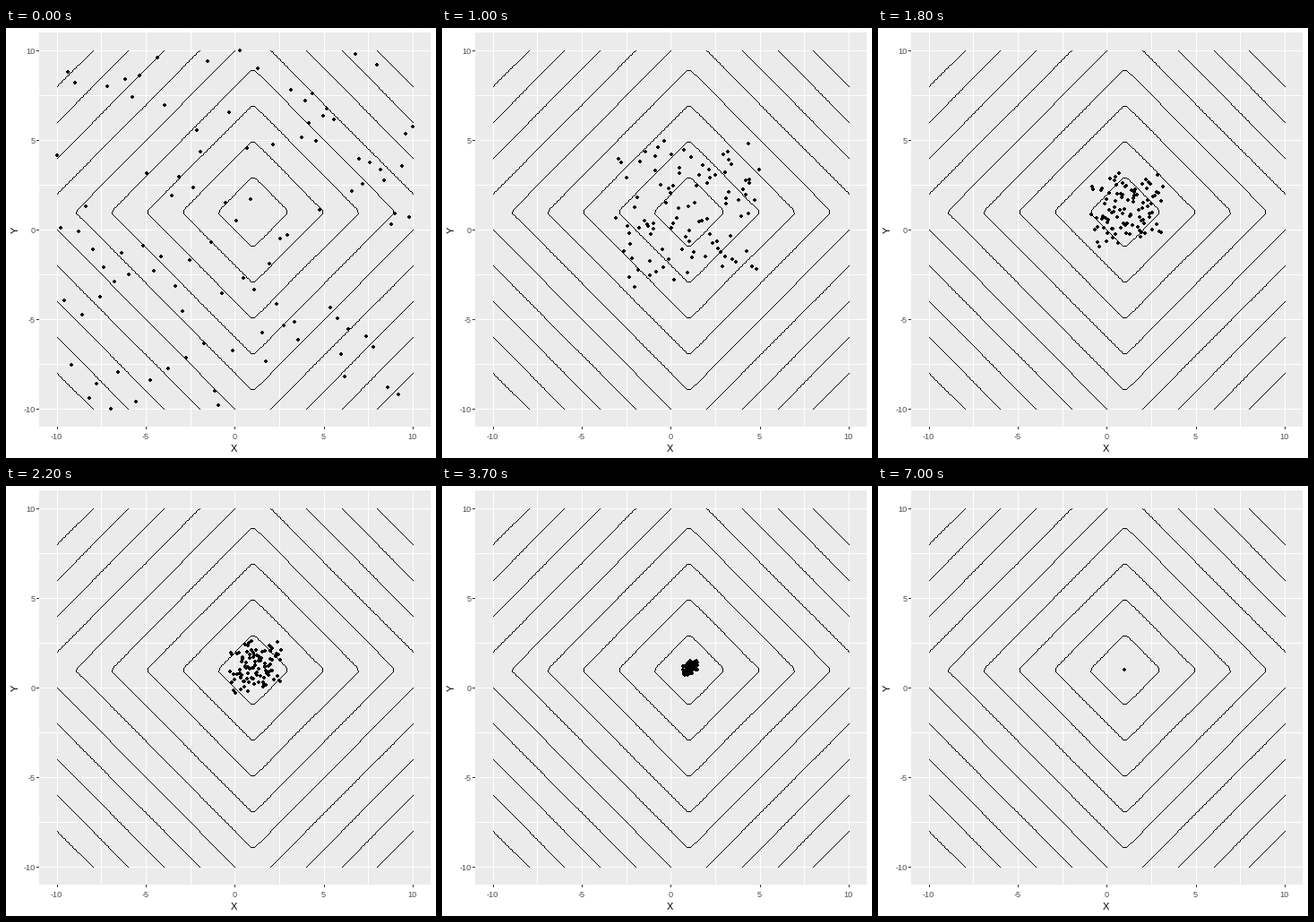
A matplotlib script for the animation above (10 s loop, 480 by 480 pixels).

```python
import numpy as np
import matplotlib.pyplot as plt
from matplotlib.animation import FuncAnimation
from matplotlib.patches import Rectangle
from matplotlib.path import Path

SIZE, DPI = 480, 80
PX = 72 / DPI  # points per pixel
FRAMES, STEP = 100, 100
COUNT, LIMIT, OPTIMUM = 100, 10, 1.0
SETTLED = 70  # from here on the whole swarm sits on the optimum

plt.rcParams["font.family"] = "Liberation Sans"

# Latin hypercube start: one particle per row and per column
rng = np.random.default_rng(4)
grid = np.linspace(-LIMIT, LIMIT, COUNT)
start = np.column_stack([grid, rng.permutation(grid)])
pulled = rng.permutation(COUNT) < COUNT // 2


def to_pixel(x, y):
    return np.floor(255.92 + 19.86 * x), np.floor(225.4 - 20 * y)


def swarm(t):
    """Exponential contraction; one half lags behind to the upper right."""
    if t >= SETTLED:
        return to_pixel(*np.full((2, COUNT), OPTIMUM))
    spread = np.exp(-.0965 * t)
    lag = .7 * min(1, t / 6) * np.exp(-(t / 37) ** 3)
    pos = OPTIMUM + spread * (start - OPTIMUM) + lag * pulled[:, None]
    return to_pixel(*pos.T)


def trace(points):
    """Pixels of a one pixel wide polyline without smoothing."""
    corners = np.column_stack(to_pixel(*points.T))
    parts = []
    for a, b in zip(corners, corners[1:]):
        n = int(abs(b - a).max())
        parts.append(np.round(np.linspace(a, b, n + 1)))
    return np.vstack(parts)


fig = plt.figure(figsize=(SIZE / DPI, SIZE / DPI), dpi=DPI, facecolor="white")
ax = fig.add_axes([0, 0, 1, 1])
ax.axis("off")


def box(x, y, w, h, color):
    ax.add_patch(Rectangle((x, y), w, h, fc=color, lw=0))


def label(x, y, text, size, color, **kw):
    ax.text(x, y, text, fontsize=size * PX, color=color, va="baseline", **kw)


def stamp(xs, ys, shape, reach):
    """Repeat a pixel shape; reach is its largest coordinate."""
    return ax.plot(xs, ys, ls="none", marker=Path(shape), ms=2 * reach * PX,
                   mew=0, color="black")[0]


# Panel, grid, ticks
L, R, TOP, BOT = 37, 474, 5, 445
box(L, TOP, R - L, BOT - TOP, "#EBEBEB")
for v in np.arange(-LIMIT, LIMIT + .1, 2.5):
    x, y = to_pixel(v, v)
    box(x, TOP, 1, BOT - TOP, "white")
    box(L, y, R - L, 1, "white")
    if v % 5 == 0:
        box(x, BOT, 1, 3, "#333333")
        box(L - 3, y, 3, 1, "#333333")
        label(x - .3, 458.6, f"{v:.0f}", 9.2, "#4D4D4D", ha="center")
        label(32.5, y + 3.9, f"{v:.0f}", 9.2, "#4D4D4D", ha="right")
label(254.8, 473, "X", 11, "black", ha="center")
label(13.3, 225.5, "Y", 11, "black", ha="center", rotation=90,
      rotation_mode="anchor")

# Contours of the Manhattan distance to the optimum
gx, gy = np.meshgrid(grid, grid)
cost = abs(gx - OPTIMUM) + abs(gy - OPTIMUM)
levels = ax.contour(gx, gy, cost, levels=np.arange(2, 21, 2))
lines = [trace(s) for segs in levels.allsegs for s in segs if len(s) > 1]
levels.remove()
stamp(*np.vstack(lines).T, [(0, 0), (1, 0), (1, -1), (0, -1), (0, 0)], 1)

# Four pixel dot without corners
dots = stamp(*swarm(0), [(-2, -1), (-1, -1), (-1, -2), (1, -2), (1, -1), (2, -1),
                         (2, 1), (1, 1), (1, 2), (-1, 2), (-1, 1), (-2, 1),
                         (-2, -1)], 2)

ax.set_xlim(0, SIZE)
ax.set_ylim(SIZE, 0)


def update(i):
    dots.set_data(*swarm(i))
    return dots,


anim = FuncAnimation(fig, update, frames=FRAMES, interval=STEP, repeat=True,
                     repeat_delay=0, blit=False)
plt.show()
```
